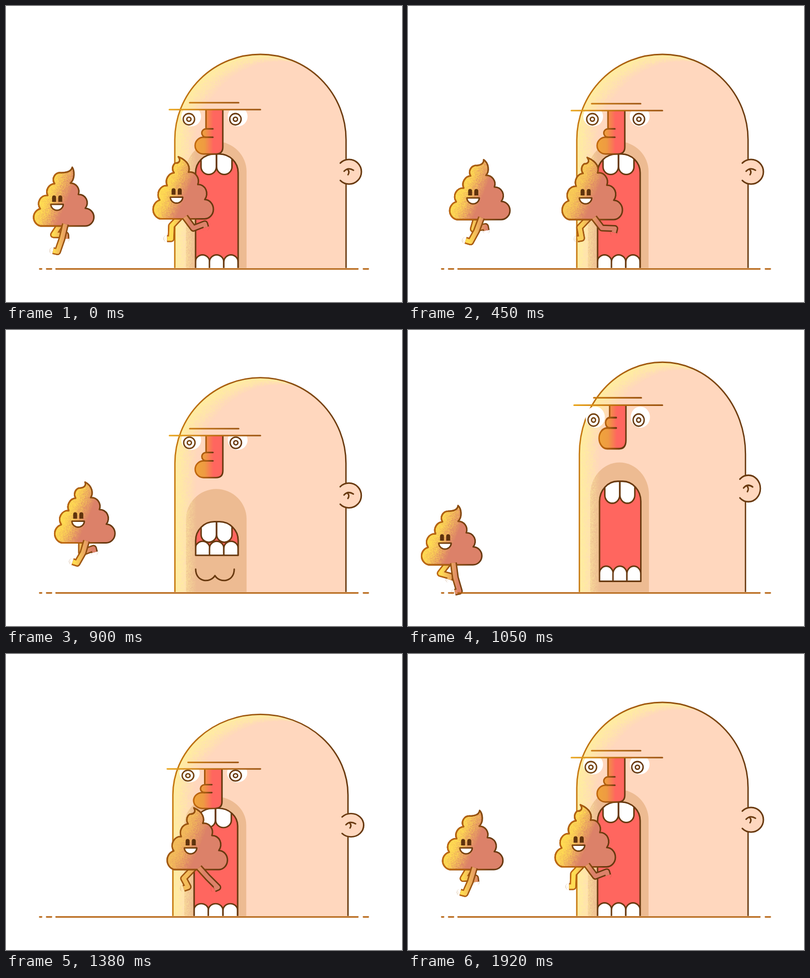
An HTML page with a canvas that plays this animation: 800x600 px, repeating every 1.95 s.

```html
<!DOCTYPE html>
<html lang="en">
<head>
<meta charset="utf-8">
<title>Big mouth</title>
<style>
html, body { margin: 0; width: 100%; height: 100%; overflow: hidden; background: #fff; }
canvas { display: block; width: 800px; height: 600px; }
</style>
</head>
<body>
<canvas id="stage" width="800" height="600"></canvas>
<script>
const ctx = document.getElementById('stage').getContext('2d');
const STEP = 30, FRAMES = 65, FLOOR = 531;
const DARK = '#68390f', LIT = '#c2690f', SKIN = '#ffd7be', RED = '#ff665f',
      TAN = '#edbb92', BROWN = '#dc8169', YELLOW = '#ffdc52';

const clamp = (v, a = 0, b = 1) => Math.min(b, Math.max(a, v));
const mod = (a, b) => ((a % b) + b) % b;
const mix = (a, b, t) => a + (b - a) * t;

// Eased value from [frame, value] pairs
function track(n, keys) {
  if (n <= keys[0][0]) return keys[0][1];
  for (let i = 1; i < keys.length; i++) {
    const [a, u] = keys[i - 1], [b, v] = keys[i];
    if (n <= b) {
      const t = (n - a) / (b - a);
      return mix(u, v, t * t * (3 - 2 * t));
    }
  }
  return keys[keys.length - 1][1];
}

// Speckled light, strength given per pixel
let seed = 7;
function random() {
  seed = (seed * 1664525 + 1013904223) >>> 0;
  return seed / 4294967296;
}
function grain(w, h, rgb, strength) {
  const c = document.createElement('canvas');
  c.width = w; c.height = h;
  const g = c.getContext('2d'), img = g.createImageData(w, h);
  for (let i = 0; i < w * h; i++) {
    const p = strength(i % w, Math.floor(i / w));
    const a = p > 0 ? clamp(p + (random() - 0.5) * 0.7 * Math.min(1, p * 3)) : 0;
    img.data.set([...rgb, a * 255], i * 4);
  }
  g.putImageData(img, 0, 0);
  return c;
}
const headLight = grain(600, 532, [255, 238, 158], (x, y) => {
  const d = y > 271 ? x - 341 : 173 - Math.hypot(x - 514, y - 271);
  return 1 - d / (44 * clamp((590 - x) / 170, 0.01));
});
const bodyLight = grain(150, 150, [255, 220, 82], (x, y) => {
  const edge = -63 + 45 * (140 - y) / 105;
  return 1.1 - (x - 75 - edge) / 46;
});

function ramp(x0, x1, ...colors) {
  const g = ctx.createLinearGradient(x0, 0, x1, 0);
  colors.forEach((c, i) => g.addColorStop(i / (colors.length - 1), c));
  return g;
}
function line(d, color = DARK, width = 3) {
  ctx.lineWidth = width;
  ctx.strokeStyle = color;
  ctx.stroke(typeof d === 'string' ? new Path2D(d) : d);
}
function shape(d, fill, stroke) {
  const p = new Path2D(d);
  ctx.fillStyle = fill;
  ctx.fill(p);
  if (stroke) line(p, stroke);
  return p;
}
function disc(x, y, r, fill, stroke) {
  const p = new Path2D();
  p.arc(x, y, r, 0, Math.PI * 2);
  ctx.fillStyle = fill;
  ctx.fill(p);
  if (stroke) line(p, stroke, 2.8);
}
function clipRect(x, y, w, h) {
  ctx.beginPath();
  ctx.rect(x, y, w, h);
  ctx.clip();
}

// ---- Head ----
const STRETCH = [[15, 1], [18, .94], [20, .9], [22, .942], [28, 1.004], [30, 1.003], [33, .97],
  [36, 1.112], [38, 1.122], [40, 1.122], [44, .905], [49, 1.015], [53, 1]];
const JAW = [[16, 533], [19, 440], [22, 442], [26, 458], [30, 457], [33, 448], [36, 533]];
const LIP = [[16, 300], [19, 389], [33, 389], [36, 299], [53, 300]];
const BROW = [[14, 210], [15, 212], [19, 222], [22, 220], [30, 215], [33, 219],
  [36, 165], [38, 158], [40, 159.5], [45, 216], [50, 208], [53, 210]];
const RAISE = [[33, 0], [37, 1], [40, 1], [44, 0]];
const GAZE = [[0, 369], [6, 372], [15, 372], [18, 369], [36, 370], [44, 370], [52, 372], [56, 372], [64, 369]];

function drawMouth(lip, jaw) {
  const outline = `M383 ${jaw}V${lip + 38}A38 38 0 0 1 421 ${lip}H431A38 38 0 0 1 469 ${lip + 38}V${jaw}Z`;
  const p = shape(outline, RED);
  ctx.save();
  ctx.clip(p);
  for (const x of [394, 425.5]) {
    shape(`M${x} ${lip - 5}V${lip + 26}A15.5 15.5 0 0 0 ${x + 31} ${lip + 26}V${lip - 5}Z`, '#fff', DARK);
  }
  for (const x of [382.5, 411, 440]) {
    shape(`M${x} ${jaw + 5}V${jaw - 14}A14.5 14.5 0 0 1 ${x + 29} ${jaw - 14}V${jaw + 5}Z`, '#fff', DARK);
  }
  ctx.restore();
  line(p);
}

function drawNose(raise) {
  ctx.save();
  ctx.translate(0, 300 - 78 * raise);
  ctx.scale(1, 1 + 0.3 * raise);
  shape('M404-130V-51A8.5 8.5 0 0 0 404-34H399A17 17 0 0 0 399 0H424Q438 0 438-14V-130',
    ramp(384, 419, '#f0a43c', '#ee9a42', RED), ramp(382, 430, LIT, '#a4560f', DARK));
  line('M404-51H418M402-34H418', ramp(398, 418, LIT, DARK));
  ctx.restore();
}

function drawEar() {
  disc(693, 336, 25, SKIN);
  const arc = new Path2D();
  arc.arc(693, 336, 25, -Math.PI * 0.75, Math.PI * 0.75);
  line(arc);
  line('M683 335Q691 326 702 333M690 331Q695 336 691 342');
}

function drawHead(n, sx, sy) {
  const lip = track(n, LIP), jaw = track(n, JAW), brow = track(n, BROW);
  const raise = track(n, RAISE), gaze = track(n, GAZE), eyeY = 229.5 - 45 * raise;
  ctx.save();
  ctx.translate(514, 532);
  ctx.scale(sx, sy);
  ctx.translate(-514, -532);
  clipRect(0, -100, 800, 100 + FLOOR);

  const skull = 'M341 540V271A173 173 0 0 1 687 271V540';
  const p = shape(skull, SKIN);
  const top = 275 + (lip - 300) * 0.54;
  shape(`M363.5 540V${top + 61}A61 61 0 0 1 486 ${top + 61}V540Z`, TAN);
  ctx.save();
  ctx.clip(p);
  ctx.drawImage(headLight, 0, 0);
  ctx.restore();
  line(p, ramp(341, 687, '#c6780f', '#a65c10', '#8c4e10', DARK), 2.8);
  drawEar();

  line(`M383 ${jaw + 28}C383 ${jaw + 54} 412 ${jaw + 57} 422 ${jaw + 41}C432 ${jaw + 57} 461 ${jaw + 54} 461 ${jaw + 28}`);
  drawMouth(lip, jaw);

  ctx.save();
  clipRect(300, brow, 300, 400);
  for (const x of [0, 94]) {
    disc(374 + x, eyeY - 5.5, 20, '#fff');
    const ink = x ? DARK : mix(0, 1, raise) > 0.5 ? '#b0620f' : '#74420f';
    disc(gaze + x + 0.5, eyeY, 11.5, '#fff', ink);
    disc(gaze + x + 0.5, eyeY, 4.2, '#fff', ink);
  }
  drawNose(raise);
  ctx.restore();
  line(`M330 ${brow}H514`, ramp(330, 514, '#e9a51c', '#bd6c10', '#9a530f'));
  line(`M371 ${brow - 14}H470`, ramp(371, 470, '#c97a12', '#9a530f'));
  ctx.restore();
}

// ---- Runners ----
// phase, knee x y, ankle x y, toe x y
const GAIT = [
  [0, 23, 19, 46, 10, 48, 17], [2, 6, 20, 30, 11, 32, 19], [4, -7, 18, 18, 17, 19, 25],
  [6, -9, 17, 15, 19, 15, 27], [10, -15, 18, -6, 35, -15, 38], [12, -11, 14, -12, 40, -20, 40],
  [14, -1, 20, -13, 41, -22, 38], [15, -4, 23, -16, 45, -26, 42], [17, -1, 26, -10, 52, -19, 50],
  [18, 2, 26, 4, 54, -5, 55], [20, 18, 26, 32, 53, 23, 56], [22, 24, 16, 44, 36, 37, 39],
  [23, 22, 17, 48, 18, 46, 26], [24, 23, 19, 46, 10, 48, 17]
];
const DROP = [476, 470, 446, 437, 433, 431.5, 431];

function drawLeg(phase, shift, lit) {
  const ph = mod(phase, 24);
  const i = GAIT.findIndex(k => k[0] > ph), a = GAIT[i - 1], b = GAIT[i];
  const t = (ph - a[0]) / (b[0] - a[0]);
  const q = a.map((v, j) => mix(v, b[j], t));
  const p = new Path2D();
  p.moveTo(6 + shift, -4);
  for (let j = 1; j < 7; j += 2) p.lineTo(q[j] + shift, q[j + 1]);
  ctx.lineCap = 'butt';
  // The round end belongs to the toe only, so the hip stays open
  const toe = new Path2D();
  toe.arc(q[5] + shift, q[6], 0.1, 0, 7);
  const both = new Path2D(p);
  both.addPath(toe);
  const layer = (w, base, light) => {
    line(both, base, w);
    ctx.globalAlpha = lit;
    line(both, light, w);
    ctx.globalAlpha = 1;
  };
  layer(14, DARK, ramp(-25, 30, LIT, 'rgba(194,105,15,0)'));
  layer(8.5, BROWN, ramp(-18, 16, YELLOW, 'rgba(255,220,82,0)'));
  ctx.lineCap = 'round';
}

function bodyPath(m) {
  const tip = 6 + 14 * Math.cos((m - 5.4) * Math.PI / 6);
  const s = (20 - tip) / 28, v = 1 + 0.09 * s;
  const y = h => -h * v;
  const bend = tip - 20, r = 23 + bend * 0.35, tipY = -119 - 7 * s;
  const ex = -3 + bend * 0.4, ey = -108 - 5 * s;
  return new Path2D(`M-44 0H45A18 ${18 * v} 0 0 0 46 ${y(36)}A17 ${17 * v} 0 0 0 32 ${y(64)}
    A17 ${17 * v} 0 0 0 ${16 + bend * 0.1} ${y(87)}
    C${r + 3} ${y(95)} ${r + 1} ${-113 - 4 * s} ${tip} ${tipY}
    C${tip - 2 + 8 * s} ${tipY + 8} ${ex + 12 - 4 * s} ${ey} ${ex} ${ey}
    A14 14 0 0 0 -16 ${y(86)}A17 ${17 * v} 0 0 0 -30 ${y(62)}
    A17 ${17 * v} 0 0 0 -45 ${y(35)}A18 ${18 * v} 0 0 0 -44 0Z`);
}

function drawRunner(m) {
  const d = Math.abs(mod(m, 12) - 7), lit = clamp((m + 6) / 6);
  ctx.save();
  ctx.translate(355.5 - 14.2 * m, DROP[Math.min(d, 12 - d)]);
  drawLeg(m + 12, -10, lit);

  const p = bodyPath(m);
  ctx.fillStyle = BROWN;
  ctx.fill(p);
  ctx.save();
  ctx.clip(p);
  ctx.globalAlpha = lit;
  ctx.drawImage(bodyLight, -75, -140);
  ctx.restore();
  line(p);
  ctx.globalAlpha = lit;
  line(p, ramp(-63, 40, LIT, '#b4610f', 'rgba(180,97,15,0)'));
  ctx.globalAlpha = 1;

  for (const x of [-17, -4.5]) shape(`M${x - 4} -49V-58A4 4 0 0 1 ${x + 4} -58V-49Z`, '#5f330d');
  shape('M-23.5 -44H1.5A12.5 12 0 0 1 -23.5 -44Z', '#fff', ramp(-24, 2, '#84490f', DARK));
  drawLeg(m, 0, lit);
  ctx.restore();
}

const STARTS = [-17, 0, 16, 48, 64];

function draw(n) {
  const sy = track(n, STRETCH), sx = 1 - 0.4 * (sy - 1);
  ctx.fillStyle = '#fff';
  ctx.fillRect(0, 0, 800, 600);
  ctx.lineCap = ctx.lineJoin = 'round';
  drawHead(n, sx, sy);

  ctx.save();
  clipRect(0, 0, 514 - 46.5 * sx, 600);
  for (const s of STARTS) if (n - s > -13 && n - s < 31) drawRunner(n - s);
  ctx.restore();

  line('M68 533H72M82 533H92M101 533H711M722 533H732', '#b5620f', 2.8);
}

function tick(now) {
  draw(Math.floor(now / STEP) % FRAMES);
  requestAnimationFrame(tick);
}
const began = performance.now();
const loop = () => {
  tick.time = performance.now() - began;
  draw(Math.floor(tick.time / STEP) % FRAMES);
  requestAnimationFrame(loop);
};
loop();
</script>
</body>
</html>
```
